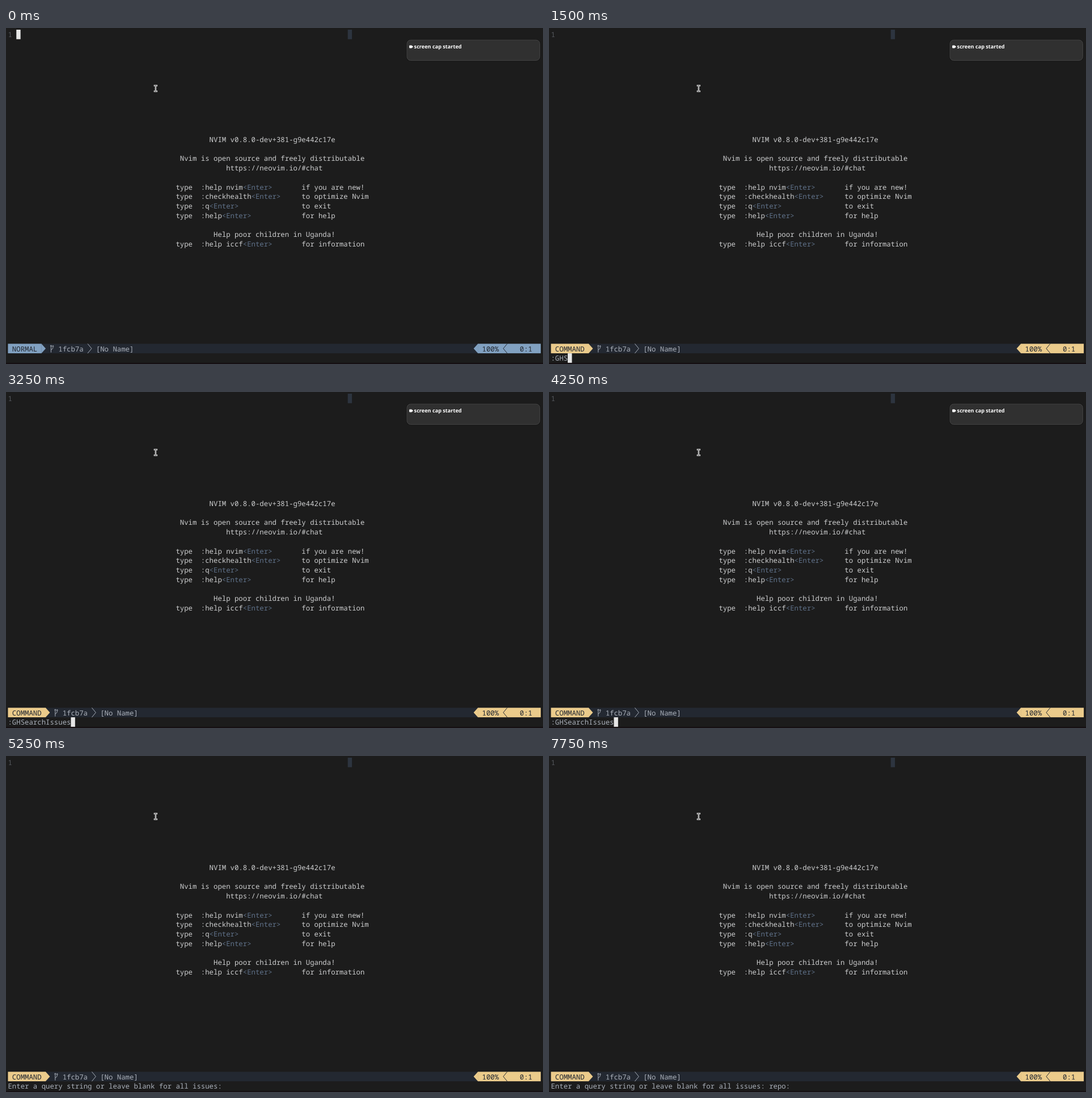
Recreate the animation shown at these times as an HTML page. Size 947 by 592 pixels, loop 8000 ms.

```html
<!DOCTYPE html>
<html lang="en">
<head>
<meta charset="utf-8">
<title>Terminal editor</title>
<style>
html, body { margin: 0; width: 100%; height: 100%; overflow: hidden; background: #1c1c1c; }
svg { display: block; width: 947px; height: 592px; }
text { white-space: pre; text-rendering: geometricPrecision; }
.mono { font: 25px "Noto Sans Mono", monospace; }
</style>
</head>
<body>
<svg id="stage" viewBox="0 0 947 592">
  <g transform="scale(.49323)">
    <rect y="1196" width="1920" height="6" fill="#150f12"/>
    <g id="grid" class="mono" transform="translate(7 6)"></g>
    <g fill="none" stroke-linecap="square">
      <path id="pointer" d="M531 206h8M535 206v20M531 226h8" stroke="#e4e4e4" stroke-width="5"/>
      <path d="M531 206h8M535 206v20M531 226h8" stroke="#1c1c1c" stroke-width="1"/>
    </g>
    <g id="notice">
      <rect x="1431" y="41" width="480" height="78" rx="15" fill="#141414"/>
      <rect x="1433.5" y="43" width="475" height="73" rx="13" fill="#303030" stroke="#474747" stroke-width="2"/>
      <path d="M1443 63h7l5 4-5 4h-7z" fill="#fff" stroke="#fff" stroke-width="2" stroke-linejoin="round"/>
      <text x="1459" y="74" fill="#fff" style="font:bold 18.5px 'Noto Sans', sans-serif">screen cap started</text>
    </g>
  </g>
</svg>
<script>
const CELL_W = 15, CELL_H = 34, BASELINE = 27, LOOP = 8000;
const FG = '#cdcecf', DIM = '#abb1bb', KEY = '#60728a', BAR = '#232831';
const BLUE = '#81a1c1', YELLOW = '#ebcb8b', CURSOR = '#e6e6e6';
const grid = document.getElementById('grid');
const notice = document.getElementById('notice');

function add(parent, tag, attrs, content = '') {
  const el = document.createElementNS('http://www.w3.org/2000/svg', tag);
  for (const name in attrs) el.setAttribute(name, attrs[name]);
  el.textContent = content;
  return parent.appendChild(el);
}
const group = (parent = grid) => add(parent, 'g', {});
const write = (col, row, content, fill = FG, parent = grid) =>
  add(parent, 'text', { x: col * CELL_W, y: row * CELL_H + BASELINE, fill }, content);
const block = (col, row, cols, fill, parent = grid) =>
  add(parent, 'rect', { x: col * CELL_W, y: row * CELL_H, width: cols * CELL_W, height: CELL_H, fill });
// Shapes are drawn inside one cell, 15 by 34 units.
const glyph = (col, row, d, attrs, parent) =>
  add(parent, 'path', { d, transform: `translate(${col * CELL_W} ${row * CELL_H})`, ...attrs });
const line = stroke => ({ fill: 'none', stroke, 'stroke-width': 2 });

function drawIntro() {
  write(0, 0, '1', '#54575c');
  block(81, 0, 1, '#2d343f');
  write(48, 11, 'NVIM v0.8.0-dev+381-g9e442c17e');
  write(41, 13, 'Nvim is open source and freely distributable');
  write(52, 14, 'https://neovim.io/#chat');
  const help = [
    [16, ':help nvim', 'if you are new!'],
    [17, ':checkhealth', 'to optimize Nvim'],
    [18, ':q', 'to exit'],
    [19, ':help', 'for help'],
    [22, ':help iccf', 'for information'],
  ];
  for (const [row, command, purpose] of help) {
    write(40, row, 'type');
    write(46, row, command);
    write(46 + command.length, row, '<Enter>', KEY);
    write(70, row, purpose);
  }
  write(49, 21, 'Help poor children in Uganda!');
}

function drawStatus(mode, color) {
  const bar = group(), row = 33, end = mode.length + 2;
  block(0, row, 127, BAR, bar);
  block(0, row, end, color, bar);
  glyph(end, row, 'M-.5 0L15 17L-.5 34z', { fill: color }, bar);
  write(1, row, mode, BAR, bar);
  glyph(end + 2, row, 'M4 6V31M11 9V14Q11 18 4 22M1.5 9L4 5L6.5 9M8.5 10L11 6L13.5 10', line(DIM), bar);
  write(end + 4, row, '1fcb7a', DIM, bar);
  glyph(end + 11, row, 'M0 0L14 17L0 34', line(DIM), bar);
  write(end + 13, row, '[No Name]', DIM, bar);
  block(112, row, 15, color, bar);
  glyph(111, row, 'M15.5 0L0 17L15.5 34z', { fill: color }, bar);
  write(113, row, '100%', BAR, bar);
  glyph(118, row, 'M15 0L1 17L15 34', line(BAR), bar);
  write(122, row, '0:1', BAR, bar);
  return bar;
}

drawIntro();
const normalBar = drawStatus('NORMAL', BLUE);
const commandBar = drawStatus('COMMAND', YELLOW);
const prompt = write(0, 34, '', DIM);
const cursor = block(0, 0, 1, CURSOR);

const COMMAND = ':GHSearchIssues';
const QUESTION = 'Enter a query string or leave blank for all issues: ';
const ANSWER = 'repo:';
// [time, characters typed]
const commandKeys = [[500, 1], [1000, 2], [1250, 3], [1500, 4], [1750, 5], [2000, 6],
  [2250, 8], [2500, 9], [2750, 10], [3000, 12], [3250, 15]];
const answerKeys = [[6000, 2], [6250, 5]];
const cursorHidden = [[3750, 4250], [5000, 5750], [6750, 7250], [7750, 8000]];

const typed = (keys, t) => keys.reduce((count, [time, n]) => t >= time ? n : count, 0);
const show = (el, visible) => el.setAttribute('visibility', visible ? 'visible' : 'hidden');

function render(t) {
  const inCommand = t >= 500;
  const content = t < 4500
    ? COMMAND.slice(0, typed(commandKeys, t))
    : QUESTION + ANSWER.slice(0, typed(answerKeys, t));
  prompt.textContent = content;
  cursor.setAttribute('x', (inCommand ? content.length : 2) * CELL_W);
  cursor.setAttribute('y', (inCommand ? 34 : 0) * CELL_H);
  show(cursor, !cursorHidden.some(([from, to]) => t >= from && t < to));
  show(normalBar, !inCommand);
  show(commandBar, inCommand);
  show(notice, t < 5250);
}

function tick() {
  render(performance.now() % LOOP);
  requestAnimationFrame(tick);
}
tick();
</script>
</body>
</html>
```
